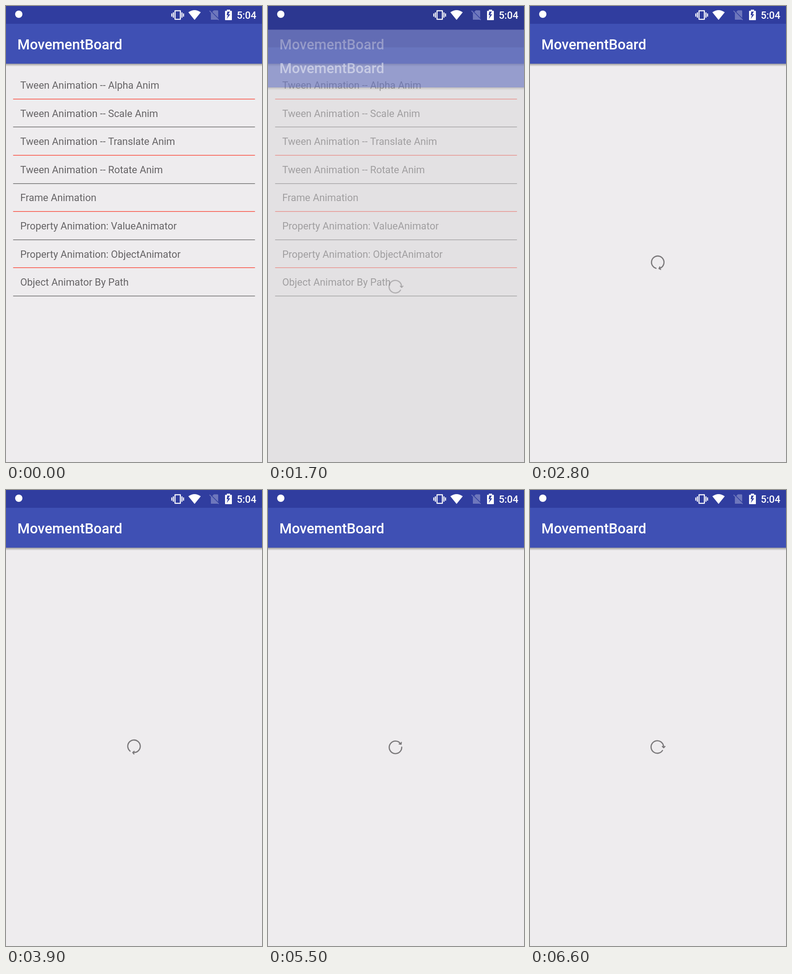
Animation, 561 px wide and 998 px high, one loop 6700 ms. Source, as an HTML page with a canvas:

```html
<!DOCTYPE html>
<html lang="en">
<head>
<meta charset="utf-8">
<title>Movement list</title>
<style>
  html, body { margin: 0; width: 100%; height: 100%; overflow: hidden; background: #eeecee; }
  canvas { display: block; }
</style>
</head>
<body>
<canvas id="stage" width="561" height="998"></canvas>
<script>
const W = 561, H = 998;
const LOOP = 6700, STEP = 100;
const OPEN = 1671, SLIDE = 350, FADE = 200;   // screen change
const SPIN_START = 1600, SPIN = 1000;
const PAPER = '#eeecee', STATUS = '#303d9f', BAR = '#3f50b4', GREY = '#7b797b';
const FONT = 'Roboto, sans-serif';
const ITEMS = [
  'Tween Animation -- Alpha Anim',
  'Tween Animation -- Scale Anim',
  'Tween Animation -- Translate Anim',
  'Tween Animation -- Rotate Anim',
  'Frame Animation',
  'Property Animation: ValueAnimator',
  'Property Animation: ObjectAnimator',
  'Object Animator By Path'
];
const BOLT = [[.17, 0], [.89, 0], [.46, .37], [1, .37], [.01, 1], [.36, .48], [0, .48]];

const ctx = document.getElementById('stage').getContext('2d');
const clamp = v => Math.min(1, Math.max(0, v));
const easeOut = (u, power) => 1 - Math.pow(1 - clamp(u), power);

function rect(x, y, w, h, color) {
  ctx.fillStyle = color;
  ctx.fillRect(x, y, w, h);
}

function text(str, x, y, font, color) {
  ctx.font = font + ' ' + FONT;
  ctx.fillStyle = color;
  ctx.fillText(str, x, y);
}

function poly(points, color) {
  ctx.fillStyle = color;
  ctx.beginPath();
  points.forEach(([x, y]) => ctx.lineTo(x, y));
  ctx.closePath();
  ctx.fill();
}

function drawFrame() {
  rect(0, 0, W, H, PAPER);
  const shade = ctx.createLinearGradient(0, 126, 0, 132.5);
  shade.addColorStop(0, 'rgba(60,58,50,.45)');
  shade.addColorStop(0.5, 'rgba(60,58,50,.22)');
  shade.addColorStop(1, 'rgba(60,58,50,0)');
  rect(0, 126, W, 7, shade);
  rect(0, 0, W, 39, STATUS);
  rect(0, 39, W, 87.3, BAR);
  text('MovementBoard', 25, 95, '500 31px', '#fff');
}

function drawList() {
  drawFrame();
  ITEMS.forEach((item, i) => {
    const y = i * 61.6;
    text(item, 31.2, 181 + y, '21.9px', '#666466');
    rect(15.6, Math.round(202.7 + y), 530, 1.3, i % 2 ? '#626262' : '#fb3b2b');
  });
}

function drawSpinner(angle) {
  ctx.save();
  ctx.translate(280.5, 562.3);
  ctx.rotate(angle * Math.PI / 180);
  ctx.translate(-1.5, 0.1);
  ctx.strokeStyle = GREY;
  ctx.lineWidth = 2.6;
  ctx.lineCap = ctx.lineJoin = 'round';
  ctx.beginPath();
  ctx.arc(0, 0, 13.7, 0.6, Math.PI * 2);
  ctx.stroke();
  ctx.lineWidth = 2.3;
  ctx.beginPath();
  ctx.moveTo(10.9, -1.2);
  ctx.lineTo(13.9, 1.7);
  ctx.lineTo(16.9, -1.2);
  ctx.stroke();
  ctx.restore();
}

function drawStatusIcons() {
  ctx.fillStyle = '#fff';
  ctx.beginPath();
  ctx.arc(28, 18, 8, 0, Math.PI * 2);
  ctx.fill();

  // vibrating phone
  ctx.strokeStyle = '#fff';
  ctx.lineWidth = 2.3;
  ctx.lineJoin = 'round';
  ctx.strokeRect(370.4, 10.4, 11.7, 18.8);
  [[362.2, 7], [365.7, 11.7], [384.4, 11.7], [387.9, 7]].forEach(([x, h]) =>
    rect(x, 19.8 - h / 2, 2.3, h, '#fff'));

  // wireless fan
  ctx.fillStyle = '#fff';
  ctx.beginPath();
  ctx.moveTo(413.2, 30.5);
  ctx.lineTo(399.6, 13.8);
  ctx.quadraticCurveTo(413.2, 4, 426.8, 13.8);
  ctx.closePath();
  ctx.fill();

  // missing card
  const faint = '#6e77bc';
  poly([[449, 16], [455.5, 9.5], [464, 9.5], [465, 10.5], [465, 30], [449, 30]], faint);
  ctx.lineCap = 'butt';
  [[STATUS, 1.2], [faint, 0]].forEach(([color, shift]) => {
    ctx.strokeStyle = color;
    ctx.lineWidth = 1.8;
    ctx.beginPath();
    ctx.moveTo(446 + shift, 10.5 - shift);
    ctx.lineTo(466 + shift, 30.5 - shift);
    ctx.stroke();
  });

  // charging battery
  rect(484, 8, 7, 4, '#fff');
  ctx.fillStyle = '#fff';
  ctx.beginPath();
  ctx.roundRect(480, 10.4, 15, 20.6, 1);
  ctx.fill();
  poly(BOLT.map(([x, y]) => [483.6 + x * 7.8, 12.2 + y * 16.4]), STATUS);

  text('5:04', 505.7, 28, '500 21.8px', '#fff');
}

function spinAngle(t) {
  // the icon rests while its screen slides in
  if (t < OPEN + SLIDE) return 0;
  const lag = 14 * Math.sin(Math.PI * clamp((t - 2800) / 2700));
  return (t - SPIN_START) / SPIN * 360 - lag;
}

function draw(t) {
  const age = t - OPEN;
  const shown = easeOut(age / FADE, 4);
  ctx.globalAlpha = 1;
  if (shown < 1) drawList();
  if (age > 0) {
    const drop = H * 0.08 * (1 - easeOut(age / SLIDE, 5));
    if (drop > 0) rect(0, 0, W, drop + 1, STATUS);
    if (age < SLIDE) rect(0, 0, W, H, `rgba(0,0,0,${0.2 * shown})`);
    ctx.save();
    ctx.translate(0, drop);
    ctx.globalAlpha = shown;
    drawFrame();
    drawSpinner(spinAngle(t));
    ctx.restore();
  }
  drawStatusIcons();
}

const start = performance.now();
function tick() {
  const t = (performance.now() - start) % LOOP;
  draw(Math.floor(t / STEP) * STEP);
  requestAnimationFrame(tick);
}
tick();
</script>
</body>
</html>
```
